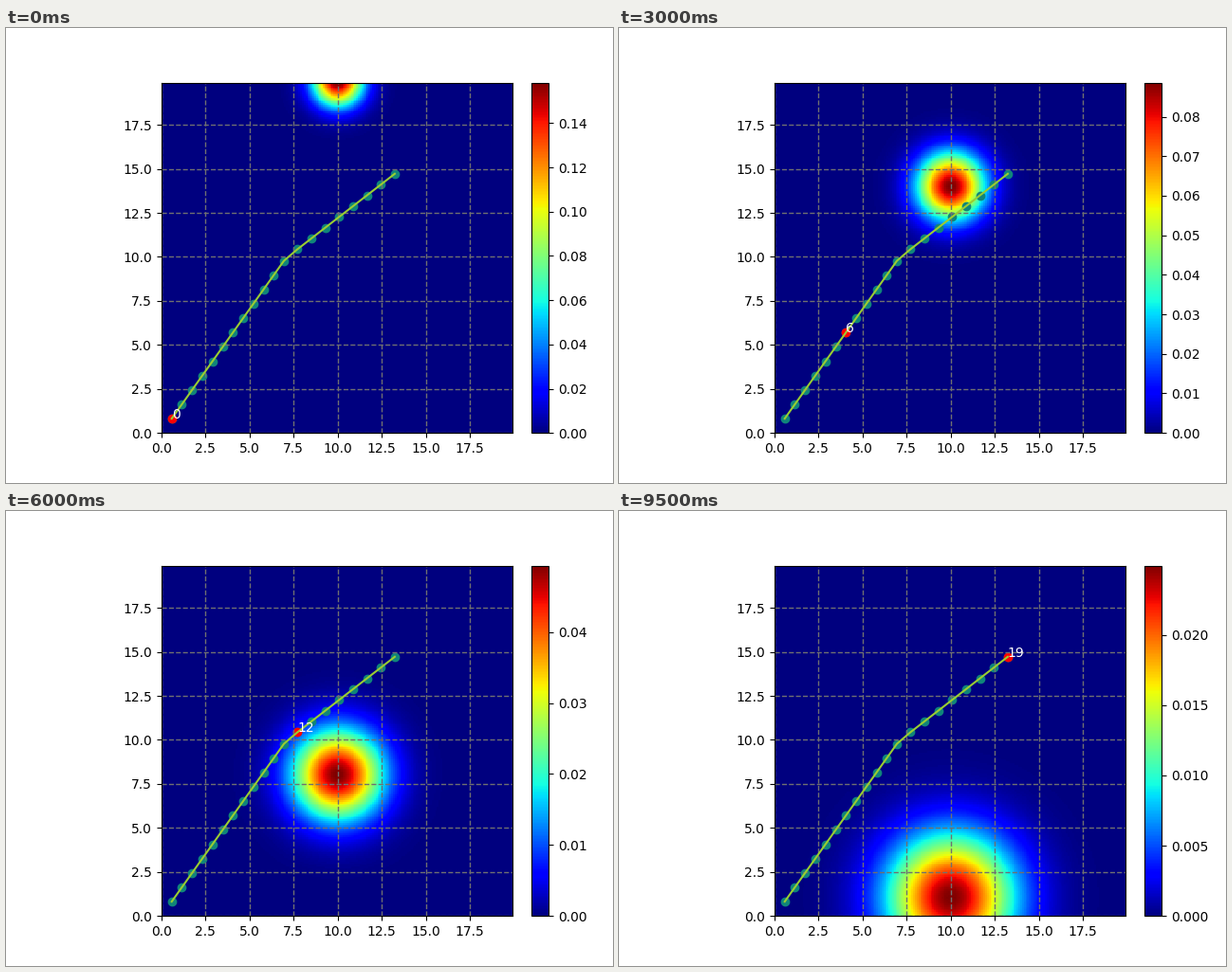
A matplotlib script that plays this animation: 640 px wide and 480 px high, repeating every 10000 ms.

```python
import numpy as np
import matplotlib.pyplot as plt
from matplotlib.animation import FuncAnimation
from mpl_toolkits.axes_grid1 import make_axes_locatable

plt.rcParams["font.family"] = "DejaVu Sans"

STEPS = 20
INTERVAL = 500
GRID = np.arange(0, 20, 0.1)
X, Y = np.meshgrid(GRID, GRID)


def density(step):
    """Gaussian that sinks one unit per step while it spreads by 5 %."""
    sigma = 1.05 ** step
    dist2 = (X - 10) ** 2 + (Y - (20 - step)) ** 2
    return np.exp(-dist2 / (2 * sigma ** 2)) / (2 * np.pi * sigma ** 2)


# Unit-length moves: straight, a short turn, straight again.
headings = np.radians([54.6] * 12 + [40.5] + [37.8] * 7)
path_x = np.cumsum(np.cos(headings))
path_y = np.cumsum(np.sin(headings))

fig, ax = plt.subplots(figsize=(6.4, 4.8), dpi=100)
fig.subplots_adjust(left=0.25, right=0.9, bottom=0.11, top=0.88)
cax = make_axes_locatable(ax).append_axes("right", size="5%", pad=0.2)

end = GRID[-1]
heat = ax.imshow(density(0), cmap="jet", origin="lower",
                 extent=(0, end, 0, end), interpolation="nearest")
fig.colorbar(heat, cax=cax)

ticks = np.arange(0, 19, 2.5)
ax.set_xticks(ticks)
ax.set_yticks(ticks)
ax.grid(color="#707070", linestyle="--", linewidth=1)

ax.scatter(path_x, path_y, color="#10857a")
current = ax.scatter(path_x[:1], path_y[:1], color="red")
ax.plot(path_x, path_y, color="yellowgreen", linewidth=1.5)
label = ax.text(path_x[0], path_y[0], "0", color="white")
ax.set_xlim(0, end)
ax.set_ylim(0, end)


def update(step):
    values = density(step)
    heat.set_data(values)
    heat.set_clim(0, values.max())
    position = (path_x[step], path_y[step])
    current.set_offsets([position])
    label.set_position(position)
    label.set_text(str(step))
    return heat, current, label


anim = FuncAnimation(fig, update, frames=STEPS, interval=INTERVAL,
                     repeat=True, repeat_delay=0, blit=False)
plt.show()
```
